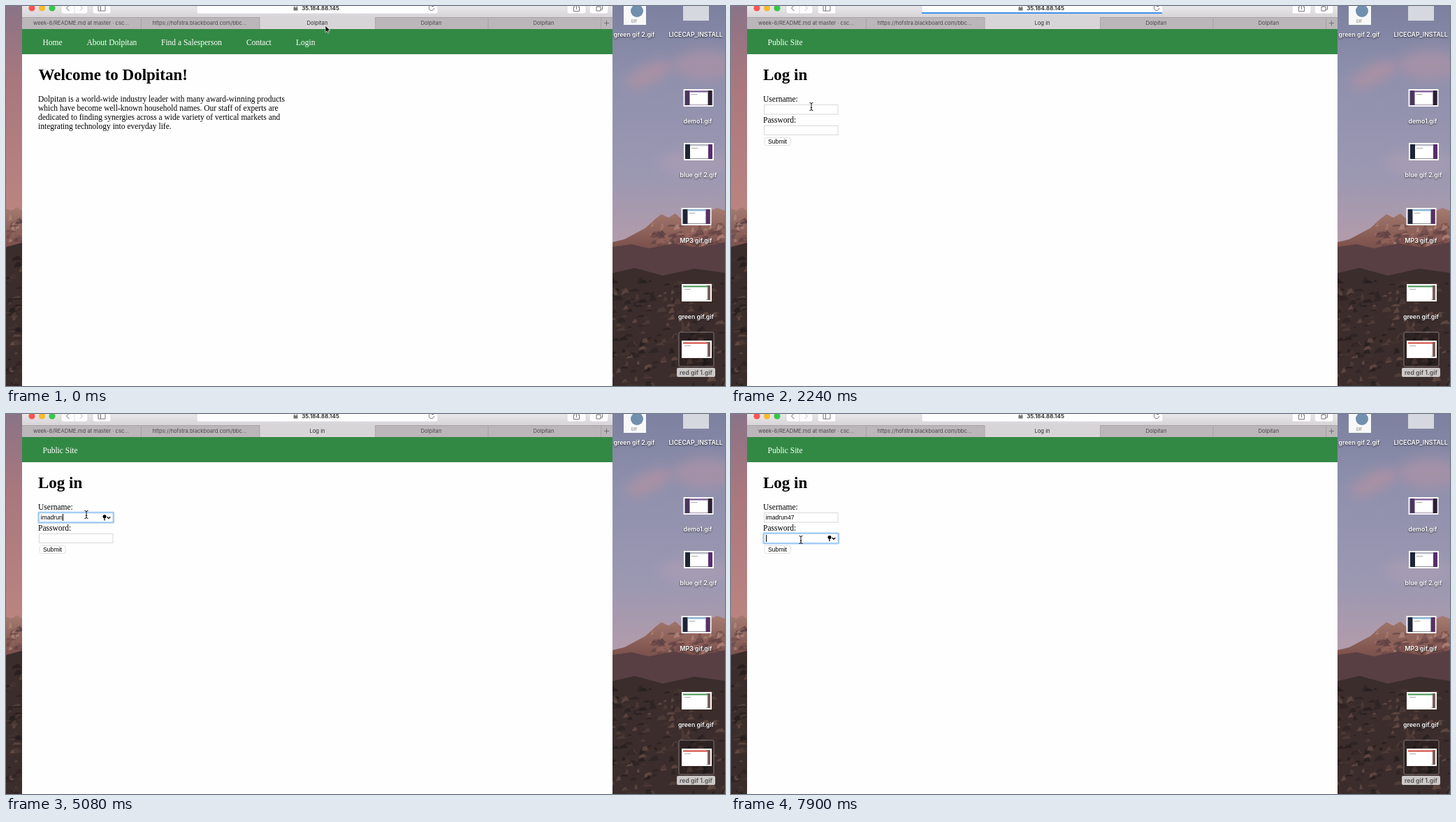
These frames come from a looping animation (1029 px wide and 544 px high, 8 s). An HTML page:

```html
<!DOCTYPE html>
<html lang="en">
<head>
<meta charset="utf-8">
<title>Log in demo</title>
<style>
  html, body { margin: 0; width: 100%; height: 100%; overflow: hidden; }
  svg { display: block; width: 1029px; height: 544px; }
  .ui { font-family: Inter, "Open Sans", sans-serif; }
  .field { font: 8.7px "Liberation Sans", Arial, sans-serif; }
  .page { font: 11.5px "Liberation Serif", "Times New Roman", serif; }
  .page .h1 { font-size: 23px; font-weight: bold; }
  .tab { font-size: 7.65px; fill: #4d4a4d; text-anchor: middle; }
  .label { font-size: 8.7px; font-weight: 600; fill: #fff; text-anchor: middle; }
  .shade { filter: drop-shadow(0 1px 1px rgba(0,0,0,.75)); }
  .line { fill: none; stroke: #6b696b; }
</style>
</head>
<body>
<svg viewBox="0 0 1029 544">
  <defs>
    <linearGradient id="sky" x2="0" y2="1">
      <stop offset="0" stop-color="#7c819f"/>
      <stop offset=".3" stop-color="#8f90ad"/>
      <stop offset=".7" stop-color="#9c98b2"/>
      <stop offset="1" stop-color="#b59ca9"/>
    </linearGradient>
    <linearGradient id="dusk" x2="0" y2="1">
      <stop offset="0" stop-color="#8a7387"/>
      <stop offset=".35" stop-color="#a9777e"/>
      <stop offset="1" stop-color="#bc8580"/>
    </linearGradient>
    <linearGradient id="ridge" x2="0" y2="1">
      <stop offset="0" stop-color="#a57a70"/>
      <stop offset=".2" stop-color="#80554f"/>
      <stop offset=".4" stop-color="#53393a"/>
      <stop offset="1" stop-color="#382a2a"/>
    </linearGradient>
    <linearGradient id="toolbar" x2="0" y2="1">
      <stop offset="0" stop-color="#e9e7e9"/>
      <stop offset="1" stop-color="#d6d3d6"/>
    </linearGradient>
    <filter id="soft" x="-50%" y="-50%" width="200%" height="200%"><feGaussianBlur stdDeviation="8"/></filter>
  </defs>

  <g id="wallpaper">
    <rect width="30" height="310" fill="url(#dusk)"/>
    <rect x="860" width="169" height="350" fill="url(#sky)"/>
    <g filter="url(#soft)">
      <ellipse cx="920" cy="98" rx="36" ry="14" fill="#a891a5" transform="rotate(-25 920 98)"/>
      <ellipse cx="1000" cy="85" rx="45" ry="22" fill="#a391a8"/>
      <ellipse cx="985" cy="225" rx="50" ry="18" fill="#a69bb3"/>
    </g>
    <path d="M0 290L8 293 16 288 30 299V544H0Z" fill="url(#ridge)"/>
    <path d="M860 340L885 334 900 326 915 318 928 306 938 298 948 303 958 297 968 306 980 300 992 303 1006 294 1018 289 1029 293V544H860Z" fill="url(#ridge)"/>
    <g id="cliffs"></g>
    <path d="M860 346L895 341 920 347 955 340 990 346 1029 338V395H860Z" fill="#583f43"/>
    <path d="M860 384L900 375 940 386 985 376 1029 382V544H860ZM0 345L30 337V544H0Z" fill="#3b2d2c"/>
    <g id="rocks"></g>
  </g>

  <g id="desktop" class="ui">
    <path d="M884-12H916V27H884Z" fill="#f8f8f8"/>
    <circle cx="903" cy="7" r="9" fill="#718fae"/>
    <text x="899" y="24" font-size="5.6" fill="#777" text-anchor="middle">GIF</text>
    <rect x="969" y="-16" width="37" height="37" fill="#d5d8de"/>
    <rect x="963" y="467" width="50" height="49" rx="2" fill="#000" fill-opacity=".25" stroke="#9a8d8c" stroke-width=".8"/>
    <rect x="960" y="518" width="55" height="13" rx="2" fill="#cdc9c9"/>
  </g>

  <g id="window">
    <rect x="23" width="845" height="544" fill="#fefefe"/>
    <rect x="23" width="845" height="17" fill="url(#toolbar)"/>
    <g fill="#fdfdfd" stroke="#cfccd0" stroke-width=".6">
      <rect x="79" y="-8" width="38" height="19" rx="3"/>
      <path d="M98-8V11"/>
      <rect x="124" y="-8" width="26" height="19" rx="3"/>
      <rect x="273" y="-8" width="345" height="19" rx="3"/>
      <rect x="803" y="-8" width="27" height="19" rx="3"/>
      <rect x="835" y="-8" width="27" height="19" rx="3"/>
    </g>
    <circle cx="37" cy="3" r="4.6" fill="#fb5753"/>
    <circle cx="51.5" cy="3" r="4.6" fill="#f8bb2c"/>
    <circle cx="66" cy="3" r="4.6" fill="#35c74a"/>
    <g class="line">
      <path d="M90.5-1L86.5 3 90.5 7"/>
      <path d="M105.5-1L109.5 3 105.5 7" stroke="#bbb"/>
      <path d="M132-1H142V7H132ZM135.5-1V7" stroke-width=".9"/>
      <path id="share" d="M814.5 1H812.5V7.5H820.5V1H818.5M816.5 5V-4" stroke-width=".9"/>
      <path d="M845 1H851V7H845ZM847.5 1V-1H853.5V5H851" stroke-width=".9"/>
      <path id="reload" d="M611.5 0A3.7 3.7 0 1 0 612.7 3M612-2.5V.5H609" stroke-width=".9"/>
      <path id="stop" d="M605.5-.5L612.5 6.5M612.5-.5L605.5 6.5" stroke-width=".9"/>
    </g>
    <g id="lock">
      <rect x="411.5" y="2" width="6" height="4.5" rx=".6" fill="#777"/>
      <path class="line" d="M412.7 2V.5A1.8 1.8 0 0 1 416.3 .5V2"/>
    </g>
    <text id="address" class="ui" y="6.3" font-size="8.1" font-weight="600" fill="#222" text-anchor="middle">35.184.88.145</text>
    <rect id="progress" x="273" y="9" height="2" fill="#3d92ef"/>
    <rect x="23" y="16" width="845" height="17" fill="#bab6ba"/>
    <rect x="363" y="16" width="166" height="17" fill="#d8d5d8"/>
    <path d="M23 16.5H363M529 16.5H868M193.5 16V33M363 16V33M528.5 16V33M690 16V33M851.5 16V33" stroke="#a19da1" stroke-width=".8"/>
    <path class="line" d="M856 24.5H863M859.5 21V28" stroke-width=".9"/>
    <g class="ui tab">
      <text x="107.5" y="27.3">week-8/README.md at master · csc...</text>
      <text x="277" y="27.3">https://hofstra.blackboard.com/bbc...</text>
      <text id="title" x="445.5" y="27.3" fill="#2f2d2f"></text>
      <text x="608.5" y="27.3">Dolpitan</text>
      <text x="769.5" y="27.3">Dolpitan</text>
    </g>
    <rect x="23" y="33" width="845" height="36" fill="#328943"/>
  </g>

  <g id="home" class="page">
    <g fill="#fff">
      <text x="52.5" y="55.5">Home</text>
      <text x="115.5" y="55.5">About Dolpitan</text>
      <text x="222" y="55.5">Find a Salesperson</text>
      <text x="344" y="55.5">Contact</text>
      <text x="415" y="55.5">Login</text>
    </g>
    <text class="h1" x="46.5" y="106">Welcome to Dolpitan!</text>
    <text x="46" y="137">Dolpitan is a world-wide industry leader with many award-winning products</text>
    <text x="46" y="150">which have become well-known household names. Our staff of experts are</text>
    <text x="46" y="163">dedicated to finding synergies across a wide variety of vertical markets and</text>
    <text x="46" y="176">integrating technology into everyday life.</text>
  </g>

  <g id="login">
    <g class="page">
      <text x="52.5" y="55.5" fill="#fff">Public Site</text>
      <text class="h1" x="46" y="106">Log in</text>
      <text x="46" y="137">Username:</text>
      <text x="46" y="167">Password:</text>
    </g>
    <g fill="#fff" stroke="#d8d8d8">
      <rect x="47.5" y="141.5" width="105.5" height="13.5"/>
      <rect x="47.5" y="171.5" width="105.5" height="13"/>
      <rect x="48" y="188.5" width="37" height="11" rx="2.5" stroke-width=".8"/>
    </g>
    <g id="focus">
      <rect x="46.5" y="141" width="107.5" height="14.5" rx="1" fill="none" stroke="#a5cdf3" stroke-width="2.4"/>
      <circle cx="141" cy="146.7" r="2.5"/>
      <path d="M141 147V152.5M144.7 147.3L147 149.6 149.3 147.3" fill="none" stroke="#000" stroke-width="1.3"/>
    </g>
    <g class="field">
      <text id="user" x="49.5" y="151.3"></text>
      <text x="66.5" y="197.2" text-anchor="middle">Submit</text>
    </g>
    <rect id="caret" width="1" height="10"/>
    <g id="menu" class="ui">
      <rect x="45.5" y="157" width="109.5" height="54" rx="5" opacity=".1"/>
      <path d="M47 157H153.5V203.5Q153.5 208 149 208H51.5Q47 208 47 203.5Z" fill="#ececec" stroke="#c2c2c2" stroke-width=".7"/>
      <path d="M47 187.5H153.5" stroke="#d2d2d2"/>
      <g fill="#c9c9c9" stroke="#969696" stroke-width=".7">
        <path d="M63.5 172H66.5V181L65 183 63.5 181Z"/>
        <circle cx="65" cy="167.5" r="5.7"/>
        <circle cx="65" cy="164.5" r="1.3" fill="#fff"/>
      </g>
      <text x="78" y="169.8" font-size="9.1" fill="#222">hbadron</text>
      <text x="78" y="181" font-size="7.9" fill="#777">From this site</text>
      <text x="59" y="200.5" font-size="9" fill="#222">Other Passwords...</text>
    </g>
  </g>

  <path id="arrow" d="M0 0V9.8L2.3 7.7 3.8 11.2 5.4 10.5 3.9 7.1H7Z" stroke="#fff" stroke-width=".7"/>
  <path id="beam" d="M-2.5-5.5Q0-5.5 0-4Q0-5.5 2.5-5.5M0-4.5V4.5M-2.5 5.5Q0 5.5 0 4Q0 5.5 2.5 5.5M-1.2 1.5H1.2" fill="none" stroke="#111"/>
</svg>
<script>
const $ = id => document.getElementById(id);
const LOOP = 8000;
const USER = 'imadrun47';

function add(parent, tag, attrs, text = '') {
  const node = document.createElementNS('http://www.w3.org/2000/svg', tag);
  for (const name in attrs) node.setAttribute(name, attrs[name]);
  node.textContent = text;
  parent.append(node);
}

let seed = 11;
const rand = () => (seed = seed * 16807 % 2147483647) / 2147483647;

function scatter(id, count, left, right, top, bottom, tones) {
  for (let i = 0; i < count; i++) {
    const x = left + rand() * (right - left);
    const y = top + rand() * (bottom - top);
    const w = 2 + rand() * 6, h = 1 + rand() * 4;
    const d = `M${x - w} ${y + h}L${x - w * .5} ${y - h * rand()}L${x + w * .4} ${y - h}L${x + w} ${y + h * .6}Z`;
    add($(id), 'path', { d, fill: tones[i % tones.length], opacity: .65 });
  }
}

function buildGround() {
  const cliff = ['#b88c80', '#6f4a48', '#93665c', '#593d40'];
  const rock = ['#211b1c', '#54403a', '#6b5148', '#2b2222', '#453430'];
  scatter('cliffs', 90, 925, 1029, 312, 345, cliff);
  scatter('cliffs', 20, 0, 24, 302, 340, cliff);
  scatter('rocks', 230, 862, 1029, 392, 544, rock);
  scatter('rocks', 50, 0, 24, 350, 544, rock);
}

function label(x, y, text, selected) {
  add($('desktop'), 'text', { class: selected ? 'label' : 'label shade', x, y, ...(selected && { style: 'fill:#514e4f' }) }, text);
}

// A small screenshot: a page, optionally on a dark desktop with side strips.
function thumb(x, y, bar, left, right) {
  const box = (dx, dy, width, height, fill) => add($('desktop'), 'rect', { x: x + dx, y: y + dy, width, height, fill });
  const inset = left ? 9 : 2;
  const width = left ? 26 : 35;
  box(0, 0, 43, 25, '#fafafa');
  box(2, 2, 39, 21, left || '#fff');
  box(35, 2, 6, 21, right);
  box(inset, 2.5, width, 20, '#fff');
  box(inset, 2.5, width, 2, bar);
  box(inset + 2, 7, 9, 1, '#aaa');
}

function buildDesktop() {
  thumb(969.5, 119, '#7b5c98', '#4a3560', '#2a2030');
  thumb(970, 196, '#c3c5d0', '#1f2436', '#5a2c70');
  thumb(966.5, 289, '#8abbe0', '#1f2638', '#553064');
  thumb(967, 398, '#429353', '', '#795f5c');
  thumb(967, 479, '#d44439', '', '#795f5c');
  label(899, 43.5, 'green gif 2.gif');
  label(987, 43.5, 'LICECAP_INSTALL');
  label(990, 168, 'demo1.gif');
  label(991, 245, 'blue gif 2.gif');
  label(987.5, 338.5, 'MP3 gif.gif');
  label(987.5, 447.5, 'green gif.gif');
  label(987.5, 528, 'red gif 1.gif', true);
}

// Each track holds [time, value] until its next entry.
const pointer = [
  [0, [457, 28]], [150, [442, 45]], [300, [402, 69]], [450, [350, 83]], [600, [330, 81]],
  [750, [352, 73]], [900, [390, 63]], [1050, [415, 56]], [1200, [419, 57]], [1350, [392, 72]],
  [1500, [290, 108]], [1650, [170, 148]], [1800, [110, 162]], [1950, [110, 159]],
  [2090, [113, 150, 'beam']], [2240, [115, 144, 'beam']], [6130, [113.5, 150, 'beam']],
  [6270, [110, 157]], [6420, [106, 172, 'beam']], [6570, [102, 181, 'beam']],
  [6710, [100, 186]], [6860, [99, 187]], [7610, [100, 180, 'beam']]
];
const typed = [[0, 0], [3130, 1], [3430, 2], [3730, 3], [3880, 4], [4630, 5], [4930, 6], [5080, 7], [5680, 8], [5830, 9]];
const caretOn = [[0, false], [2390, true], [2840, false], [3130, true], [4480, false], [4630, true], [5530, false], [5680, true], [6860, false], [7900, true]];
const focusAt = [[0, ''], [2390, 'user'], [6860, ''], [7900, 'password']];
const loaded = [[0, 0], [1200, 42], [1500, 43], [1650, 45], [1800, 48], [1950, 62], [2090, 120], [2240, 344], [2390, 0]];
const menuAlpha = [[0, 0], [2390, 1], [3280, .45], [3430, 0]];

const at = (track, t) => track.findLast(([start]) => start <= t)[1];
const show = (id, on) => $(id).setAttribute('visibility', on ? 'visible' : 'hidden');

function render(t) {
  const onLogin = t >= 1650;
  const loading = t >= 1200 && t < 2240;
  const connecting = loading && !onLogin;
  show('home', !onLogin);
  show('login', onLogin);
  $('title').textContent = onLogin ? 'Log in' : 'Dolpitan';
  $('address').setAttribute('x', connecting ? 446.5 : 450);
  show('lock', !connecting);
  $('share').setAttribute('opacity', connecting ? .35 : 1);
  show('reload', !loading);
  show('stop', loading);
  $('progress').setAttribute('width', at(loaded, t));

  const focus = at(focusAt, t);
  const drop = focus === 'password' ? 29.7 : 0;
  show('focus', focus);
  $('focus').setAttribute('transform', `translate(0 ${drop})`);
  const user = $('user');
  user.textContent = USER.slice(0, at(typed, t));
  const end = focus === 'user' && user.textContent ? user.getComputedTextLength() : .5;
  $('caret').setAttribute('x', Math.round(49.5 + end));
  $('caret').setAttribute('y', 143 + Math.round(drop));
  show('caret', at(caretOn, t));
  const alpha = at(menuAlpha, t);
  show('menu', alpha);
  $('menu').setAttribute('opacity', alpha);

  const [x, y, kind = 'arrow'] = at(pointer, t);
  for (const id of ['arrow', 'beam']) {
    show(id, id === kind);
    $(id).setAttribute('transform', `translate(${x} ${y})`);
  }
}

buildGround();
buildDesktop();
const began = performance.now();
function tick() {
  render((performance.now() - began) % LOOP);
  requestAnimationFrame(tick);
}
tick();
</script>
</body>
</html>
```
